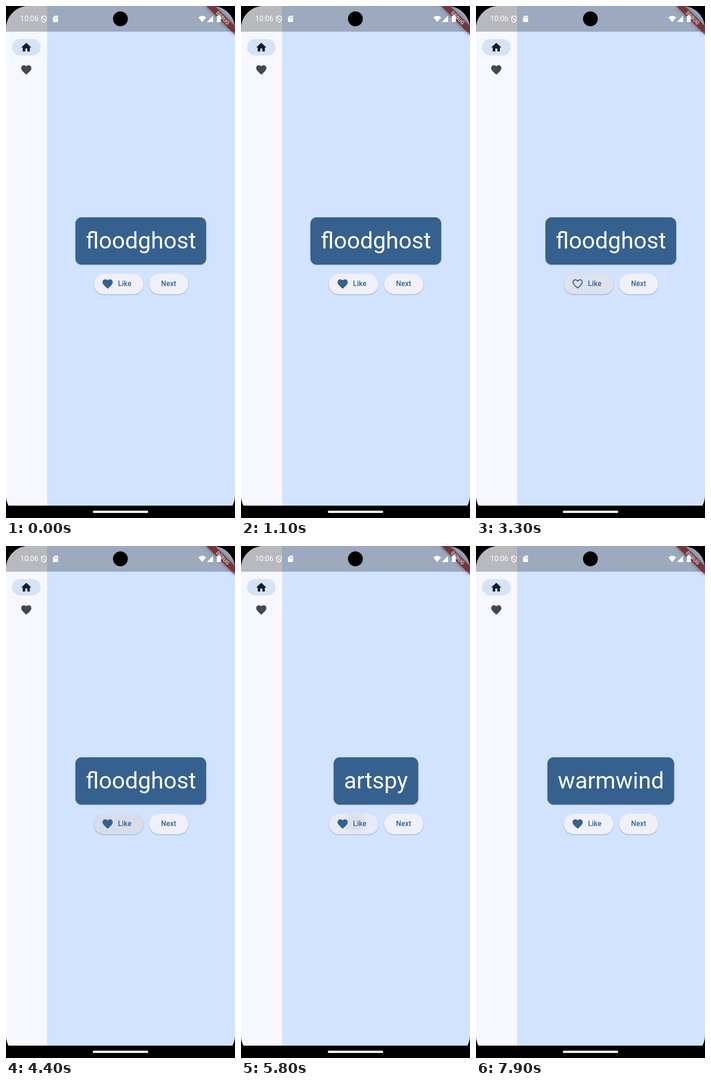
These frames come from a looping animation (501 by 1117 pixels, 8 s). An HTML page:

```html
<!DOCTYPE html>
<html lang="en">
<head>
<meta charset="utf-8">
<title>Word pairs</title>
<style>
html, body { margin: 0; width: 100%; height: 100%; overflow: hidden; background: #000; }
body { position: relative; font-family: Roboto, sans-serif; }
div, svg { position: absolute; box-sizing: border-box; }
#phone { left: 0; top: 0; width: 501px; height: 1117px; border-radius: 50px; overflow: hidden; background: #000; }
#app { left: 0; top: 0; width: 501px; height: 1090px; background: #d1e3ff; overflow: hidden; }
#rail { left: 0; top: 0; width: 89.5px; height: 1090px; background: #f7f8ff; }
#pill { left: 13.4px; top: 72px; width: 62.6px; height: 35.8px; border-radius: 18px; background: #d6e3f7; }
#card {
  left: 295.2px; top: 461px; height: 102.8px; padding: 0 22.4px; transform: translateX(-50%);
  border-radius: 13.4px; background: #36618e; color: #fff; font-size: 50.31px; line-height: 102.8px;
  white-space: nowrap; box-shadow: 0 1px 2px rgba(0,0,0,.35);
}
.button {
  top: 584.4px; height: 44.7px; border-radius: 23px; background: #eff0f9; color: #36618e;
  font-weight: 500; font-size: 15.65px; line-height: 44.7px; letter-spacing: .11px;
  box-shadow: 0 1px 2px rgba(0,0,0,.32);
}
#like { left: 191.6px; width: 109.6px; padding-left: 53.5px; }
#next { left: 312.5px; width: 86.5px; text-align: center; }
#banner {
  left: 456.3px; top: 31.3px; width: 89.4px; height: 13.4px; transform-origin: 44.7px -31.3px; transform: rotate(45deg);
  background: linear-gradient(#b71c1ca0, #b71c1ca0), rgba(0,0,0,.4); box-shadow: 0 0 9px rgba(0,0,0,.5);
  color: #fff; font-weight: 900; font-size: 11.4px; line-height: 13.4px; text-align: center;
}
#shade { left: 0; top: 0; width: 501px; height: 56px; background: rgba(0,0,0,.255); }
#clock { left: 31px; top: 18px; color: #fff; font-size: 16px; line-height: 20px; }
#bar { left: 190px; top: 1101px; width: 121px; height: 5px; border-radius: 3px; background: #fff; }
.icon { width: 26.8px; height: 26.8px; }
</style>
</head>
<body>
<div id="phone">
  <div id="app">
    <div id="rail"></div>
    <div id="pill"></div>
    <svg class="icon" style="left:31.3px;top:76.6px" viewBox="0 0 24 24" fill="#101c2b"><path d="M10 20v-6h4v6h5v-8h3L12 3 2 12h3v8z"/></svg>
    <svg class="icon" style="left:31.3px;top:125.7px" viewBox="0 0 24 24" fill="#43474e"><path class="heart"/></svg>
    <div id="card"></div>
    <div id="like" class="button">Like<svg class="icon" style="left:17.8px;top:9px" viewBox="0 0 24 24" fill="#36618e" fill-rule="evenodd"><path id="mark"/></svg></div>
    <div id="next" class="button">Next</div>
    <div id="banner">DEBUG</div>
  </div>
  <div id="shade"></div>
  <div id="clock">10:06</div>
  <svg width="501" height="56" style="left:0;top:0" fill="#fff">
    <path d="M83 21.5 77.8 23.5V28C77.8 31.6 80 34.5 83 35.7 86 34.5 88.3 31.6 88.3 28V23.5ZM78.5 23.8 87.2 33" fill="none" stroke="#fff" stroke-width="1.5"/>
    <path fill-rule="evenodd" d="M107 21h5.5q1.3 0 1.3 1.3v11.4q0 1.3-1.3 1.3h-8.4q-1.3 0-1.3-1.3V25.2ZM106.3 24.5v2.8h1.3v-2.8ZM108.6 24.5v2.8h1.3v-2.8ZM110.9 24.5v2.8h1.3v-2.8Z"/>
    <path d="M420.8 24.7Q429.3 17.6 437.9 24.7L429.3 35Z"/>
    <path d="M453 21.3V35H439.6Z"/>
    <path d="M463.7 21.5v-1.6h3.8v1.6h1.4q1 0 1 1v11.6q0 1-1 1h-6.7q-1 0-1-1V22.5q0-1 1-1Z"/>
    <circle cx="250.3" cy="28" r="16.2" fill="#000"/>
  </svg>
  <div id="bar"></div>
</div>
<script>
const HEART = 'M12 21.35l-1.45-1.32C5.4 15.36 2 12.28 2 8.5 2 5.42 4.42 3 7.5 3c1.74 0 3.41.81 4.5 2.09C13.09 3.81 14.76 3 16.5 3 19.58 3 22 5.42 22 8.5c0 3.78-3.4 6.86-8.55 11.54z';
const HOLE = 'M12 18.65l.1-.1C16.86 14.24 20 11.39 20 8.5 20 6.5 18.5 5 16.5 5c-1.54 0-3.04.99-3.56 2.36h-1.87C10.54 5.99 9.04 5 7.5 5 5.5 5 4 6.5 4 8.5c0 2.89 3.14 5.74 7.9 10.05z';
const WORDS = ['floodghost', 'artspy', 'warmwind'];
const LOOP = 8000, RELEASE = 80, FADE_AT = 340, FADE_END = 700;
const TAPS = [[2850, 'like'], [4070, 'like'], [4880, 'next'], [5700, 'like'], [6500, 'next'], [7200, 'like']];
const SPOT = { like: '58.5px 18.5px', next: '45.5px 18.5px' };

const $ = id => document.getElementById(id);
const clamp = x => Math.max(0, Math.min(1, x));
const tint = a => `rgba(54,97,142,${a.toFixed(4)})`;

// Soft disc growing from the touch point over an even highlight, both fading out
function ripple(age, spot) {
  const fade = 1 - clamp((age - FADE_AT) / (FADE_END - FADE_AT));
  const glow = tint(.06 * fade * clamp(age / 150));
  const ink = tint(.08 * fade * clamp(age / 60));
  const r = 11 + age * age * .0017;
  return `radial-gradient(circle at ${spot}, ${ink} ${r * .45}px, ${tint(0)} ${r}px), linear-gradient(${glow}, ${glow})`;
}

function setText(el, text) {
  if (el.textContent !== text) el.textContent = text;
}

function draw(t) {
  let word = 0, liked = true;
  const ink = { like: 'none', next: 'none' };
  for (const [start, name] of TAPS) {
    const age = t - start;
    if (age >= 0 && age < FADE_END) ink[name] = ripple(age, SPOT[name]);
    if (age < RELEASE) continue;
    if (name === 'next') {
      word++;
      liked = false;
    } else liked = !liked;
  }
  setText($('card'), WORDS[word]);
  $('mark').setAttribute('d', liked ? HEART : HEART + HOLE);
  for (const name in ink) $(name).style.backgroundImage = ink[name];
}

function tick() {
  draw(performance.now() % LOOP);
  requestAnimationFrame(tick);
}

document.querySelector('.heart').setAttribute('d', HEART);
tick();
</script>
</body>
</html>
```
